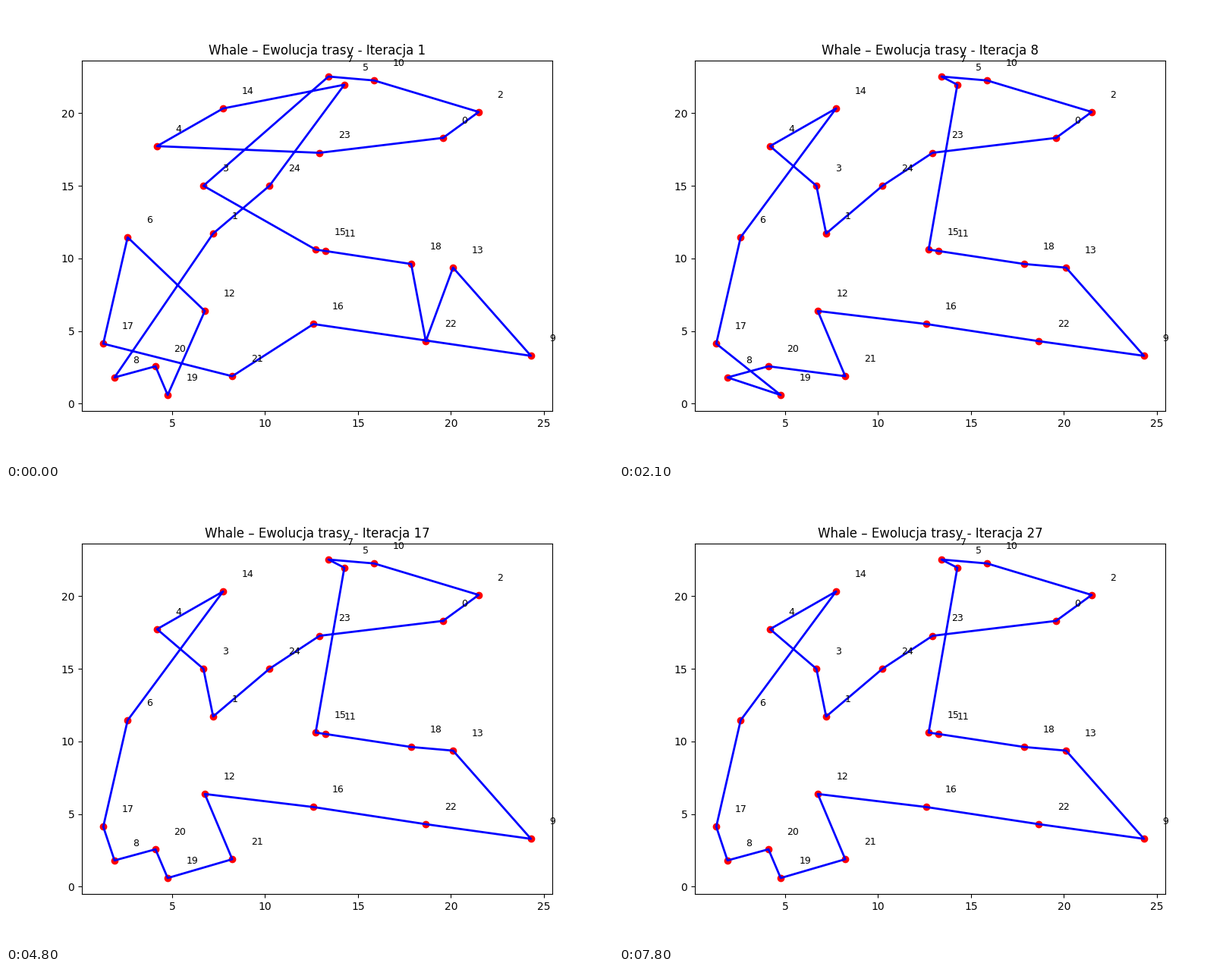
Animation, 800 px wide and 600 px high, one loop 8000 ms. Source, as a matplotlib script:

```python
import matplotlib.pyplot as plt
import numpy as np
from matplotlib.animation import FuncAnimation

STEP_MS, TICK_MS, LOOP_MS = 300, 100, 8000
X_LIM, Y_LIM = (0.15, 25.45), (-0.5065, 23.6165)

# City positions on the 800x600 stage, measured from its top left corner.
CITIES_PX = np.array([
    (576, 173.9), (273, 300), (623, 139.7), (260.2, 237.1), (199.1, 184.8),
    (445.9, 103.8), (160.3, 305), (425, 93), (143, 489.8), (691.82, 461.3),
    (485.2, 98.2), (421.2, 323.1), (262, 402.2), (589.2, 345), (286.1, 135.1),
    (408.1, 321.2), (405.2, 419.4), (128.18, 445.3), (534, 340.2), (213.1, 513),
    (197, 475.1), (298.2, 488.2), (553.3, 442), (413.2, 193.6), (347.2, 237.1),
])
xs = X_LIM[0] + (CITIES_PX[:, 0] - 100) / 620 * (X_LIM[1] - X_LIM[0])
ys = Y_LIM[0] + (534 - CITIES_PX[:, 1]) / 462 * (Y_LIM[1] - Y_LIM[0])

HEAD = [0, 23]
EAST = [16, 22, 9, 13, 18, 11, 15, 5]
TAIL = [7, 10, 2, 0]

# First iteration at which each tour is the best one.
TOURS = [
    (1, [4, 14, 5, 24, 1, 8, 20, 19, 12, 6, 17, 21, 16, 9, 13, 22, 18, 11, 15, 3]),
    (2, [4, 14, 3, 24, 1, 17, 8, 19, 20, 6, 12, 21] + EAST),
    (4, [24, 14, 3, 4, 1, 6, 17, 19, 8, 20, 12, 21] + EAST),
    (7, [24, 1, 3, 4, 14, 6, 17, 19, 8, 20, 21, 12] + EAST),
    (11, [24, 1, 3, 4, 14, 6, 17, 8, 20, 19, 21, 12] + EAST),
]

fig, ax = plt.subplots(figsize=(8, 6), dpi=100)
ax.scatter(xs, ys, c="red")
route, = ax.plot([], [], "b-", linewidth=2)
for city, (x, y) in enumerate(zip(xs, ys)):
    ax.text(x + 1, y + 1, str(city), fontsize=9)
ax.set(xlim=X_LIM, ylim=Y_LIM)
title = ax.set_title("")


def best_tour(iteration):
    middle = [tour for start, tour in TOURS if start <= iteration][-1]
    return HEAD + middle + TAIL


def update(frame):
    iteration = frame * TICK_MS // STEP_MS + 1
    tour = best_tour(iteration)
    route.set_data(xs[tour], ys[tour])
    title.set_text(f"Whale – Ewolucja trasy - Iteracja {iteration}")
    return route, title


anim = FuncAnimation(fig, update, frames=LOOP_MS // TICK_MS, interval=TICK_MS,
                     repeat=True, repeat_delay=0)
plt.show()
```
